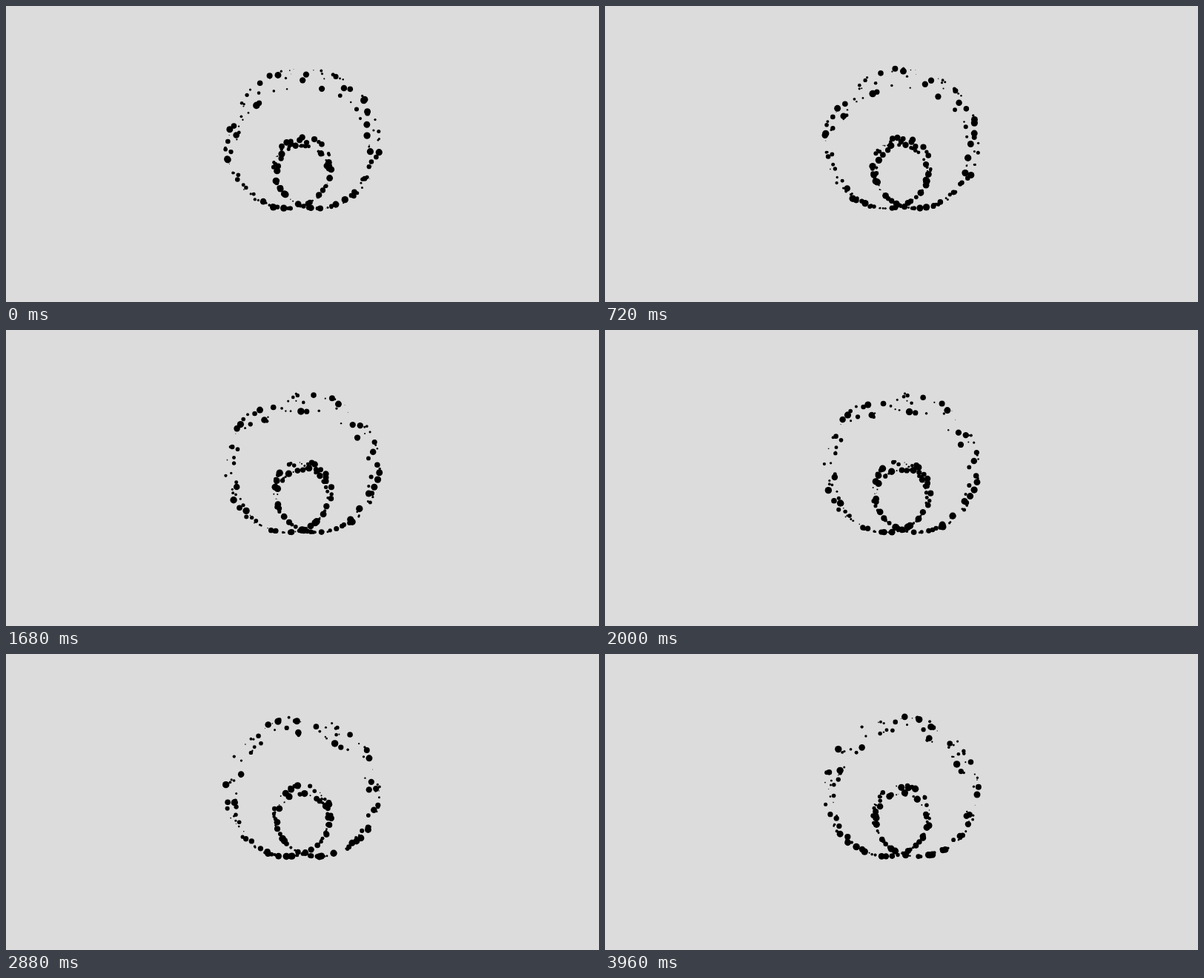
Animation of 800x400 px, one loop 4 s. Source, as an HTML page:

```html
<!DOCTYPE html>
<html lang="en">
<head>
<meta charset="utf-8">
<title>Limaçon dots</title>
<style>
  html, body { margin: 0; width: 100%; height: 100%; overflow: hidden; background: #dcdcdc; }
  svg { display: block; width: 100%; height: 100%; }
</style>
</head>
<body>
<svg id="stage" viewBox="0 0 800 400"></svg>
<script>
const LOOP = 4000, STEP = 40, COUNT = 220, TURN = 2 * Math.PI;
const NODE = { x: 400, y: 270 };
const stage = document.getElementById('stage');

// Seeded generator (mulberry32), so every load looks the same.
let seed = 41;
function rand(lo, hi) {
  seed = (seed + 0x6D2B79F5) | 0;
  let t = Math.imul(seed ^ (seed >>> 15), 1 | seed);
  t = (t + Math.imul(t ^ (t >>> 7), 61 | t)) ^ t;
  return lo + (hi - lo) * ((t ^ (t >>> 14)) >>> 0) / 4294967296;
}

// Jittered slots keep the curve evenly covered without looking regular.
function makeDot(_, i) {
  const el = document.createElementNS('http://www.w3.org/2000/svg', 'circle');
  el.setAttribute('r', rand(0.4, 4.8).toFixed(2));
  stage.appendChild(el);
  return {
    el,
    angle: (i + rand(-2, 2)) / COUNT * TURN,
    speed: rand(0.22, 0.29),
    scale: 1 + 0.075 * Math.sin(rand(0, TURN))
  };
}

const dots = Array.from({ length: COUNT }, makeDot);

// Each dot follows its own slightly scaled limaçon through the node.
function draw(ms) {
  const sec = Math.floor(ms % LOOP / STEP) * STEP / 1000;
  for (const d of dots) {
    const a = d.angle + d.speed * sec;
    const r = (43 + 130 * Math.cos(a)) * d.scale;
    d.el.setAttribute('cx', (NODE.x + r * Math.sin(a)).toFixed(2));
    d.el.setAttribute('cy', (NODE.y - r * Math.cos(a)).toFixed(2));
  }
}

const start = performance.now();
function tick() {
  draw(performance.now() - start);
  requestAnimationFrame(tick);
}
draw(0);
requestAnimationFrame(tick);
</script>
</body>
</html>
```
